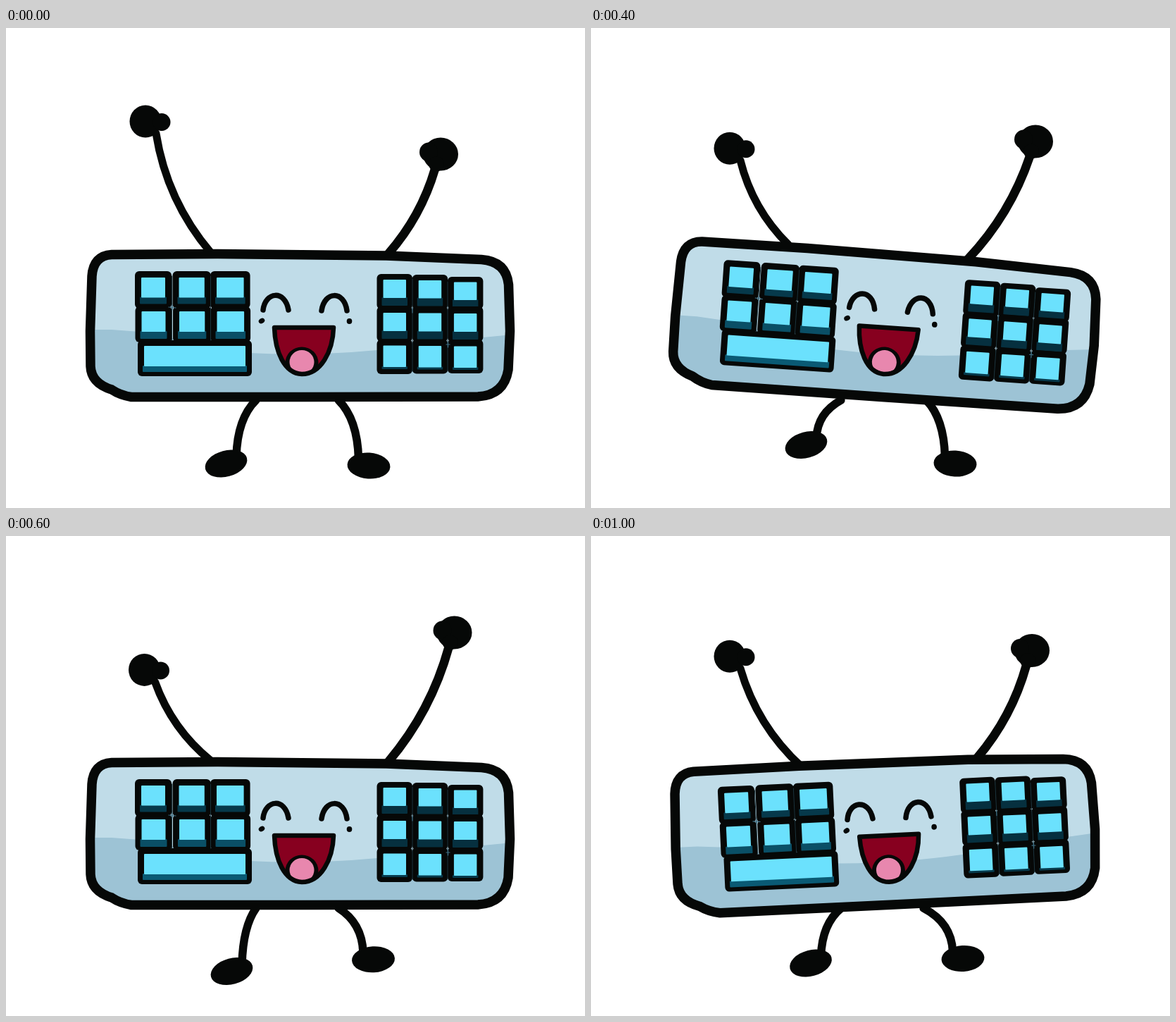
These frames come from a looping animation (822x681 px, 1.2 s). An HTML page with a canvas:

```html
<!DOCTYPE html>
<html lang="en">
<head>
<meta charset="utf-8">
<title>Dancing keyboard</title>
<style>
  html, body { margin: 0; width: 100%; height: 100%; overflow: hidden; background: #fff; }
  canvas { display: block; width: 822px; height: 681px; }
</style>
</head>
<body>
<canvas id="stage" width="822" height="681"></canvas>
<script>
const ctx = document.getElementById('stage').getContext('2d');
const INK = '#060807', LIGHT = '#c0dce8', SHADE = '#9dc3d5', KEY = '#6be1fd';
const STEP = 200, POSES = 6, RAD = Math.PI / 180;

// Body tilt in degrees, one value per pose
const TILT = [0, 2.7, 4, 0, -2, -2.7];

// Key points of hands and feet: pose, x, y
const HANDS = {
  left: [[0, 198, 132.5], [4, 196, 209]],
  right: [[0, 617, 179], [1, 612, 202.5], [2, 631, 161], [4, 642, 113], [5, 626, 162.5]]
};
const FEET = {
  left: [[0, 312.5, 618], [2, 305.5, 591.5], [3, 320.5, 617.5], [4, 313, 606.5], [5, 312, 606]],
  right: [[0, 515, 621], [2, 517, 618], [4, 526, 583.5], [5, 528, 599.5]]
};

// Position on a looping track of key points
function along(track, pose) {
  const i = track.findLastIndex(k => k[0] <= pose);
  const [t0, x0, y0] = track[i];
  const [t1, x1, y1] = track[(i + 1) % track.length];
  const p = (pose - t0) / ((t1 - t0 + POSES) % POSES);
  return [x0 + (x1 - x0) * p, y0 + (y1 - y0) * p];
}

function blob(x, y, rx, ry, deg = 0, color = INK) {
  ctx.fillStyle = color;
  ctx.beginPath();
  ctx.ellipse(x, y, rx, ry, deg * RAD, 0, Math.PI * 2);
  ctx.fill();
}

function line(path, width, color = INK) {
  ctx.strokeStyle = color;
  ctx.lineWidth = width;
  ctx.stroke(new Path2D(path));
}

function fill(path, color) {
  ctx.fillStyle = color;
  ctx.fill(path);
}

function box(x, y, w, h, r, color) {
  ctx.fillStyle = color;
  ctx.beginPath();
  ctx.roundRect(x, y, w, h, r);
  ctx.fill();
}

// Line from a to b, bowed sideways by a share of its length
function bow([ax, ay], [bx, by], bend, width) {
  const cx = (ax + bx) / 2 + (by - ay) * bend;
  const cy = (ay + by) / 2 - (bx - ax) * bend;
  line(`M${ax} ${ay}Q${cx} ${cy} ${bx} ${by}`, width);
}

function arms(pose) {
  const tilt = TILT[pose];
  let [x, y] = along(HANDS.left, pose);
  bow([x + 15, y + 17], [291 - 2.8 * tilt, 319 - 3 * tilt], -0.14, 11);
  blob(x, y, 22.5, 23);
  blob(x + 23, y + 1, 12.5, 12.5);

  [x, y] = along(HANDS.right, pose);
  bow([x - 8, y + 21], [543 - 2 * tilt, 320 + 2 * tilt], 0.11, 12.5);
  blob(x, y, 25, 23.5);
  blob(x - 17, y - 3, 13, 13.5);
  blob(x - 6, y + 14, 11, 10.5);
}

function leg(hip, [x, y], side, deg) {
  const knee = x - side * 16, ankle = x - side * 14.5;
  line(`M${hip} 528Q${knee} ${528 + (y - 528) * 0.29} ${ankle} ${y - 10}`, 11.5);
  blob(x, y, 30.5, 18.5, deg);
}

function legs(pose) {
  const right = along(FEET.right, pose);
  leg(355, along(FEET.left, pose), -1, -15);
  leg(472 + Math.max(0, TILT[pose]), right, 1, (right[1] - 610) * 0.35);
}

function key(x, y, w, h, top, faceH, stripH, strip) {
  box(x, y, w, h, 6, INK);
  box(x + 7, top + faceH - 1, w - 14, stripH + 1, 1, strip);
  box(x + 9, top, w - 18, faceH, 1, KEY);
}

function keys() {
  for (let c = 0; c < 3; c++) {
    const x = 183 + 53.5 * c, w = 52 + 2.3 * c;
    key(x, 345, w, 53, 354, 28.5, 9, '#06394b');
    key(x + 0.5, 395, w, 51, 402, 29, 10, '#0a4f66');
  }
  key(187, 443, 162, 51, 451, 29, 8, '#0a5a74');
  for (let c = 0; c < 3; c++) {
    const x = 526.5 + 50.2 * c, drop = c * c;
    key(x, 349 + drop, 50.5, 50 - drop, 357 + drop * 0.9, 26 - c / 3, 11, '#06303f');
    key(x, 395, 50.5, 50, 404 + c / 2, 26, 11, '#06303f');
    key(x, 442, 50.5, 49 - c / 2, 450.5 + c / 2, 30.5, 3, '#073a4c');
  }
  line('M235.5 352V443M290.5 352V443M577 356V487M627 360V487', 1, '#1b333c');
  line('M231 396L241 397M236 393V400M577 397V404M625 449H630M627.5 445V453', 1.2, '#3f7085');
}

function face() {
  line('M365 400C368 374 396 371 401 400M448 401C452 373 480 372 484 401', 7.5);
  blob(363, 415.5, 4.5, 3.5, -30);
  blob(487.5, 416, 3.8, 4);
  const mouth = new Path2D('M381 425L465 425C464 459 447 491 420 491C395 490 382 459 381 425Z');
  fill(mouth, '#87001f');
  ctx.save();
  ctx.clip(mouth);
  blob(420, 475, 23.5, 22.5);
  blob(420, 474, 17.5, 17, 0, '#e887ae');
  ctx.restore();
  ctx.strokeStyle = INK;
  ctx.lineWidth = 6.5;
  ctx.stroke(mouth);
}

function body(pose) {
  const shell = new Path2D('M150 321.5L300 320.5L540 323L675 328.5Q710 331 713.5 364L715.5 430L713 485Q707 521 670 523L420 523.5L178 523.5Q162 521 150 513Q121 504 120 480L119.5 430L122 352Q124 323 150 321.5Z');
  ctx.save();
  ctx.translate(418, 422);
  ctx.rotate(TILT[pose] * RAD);
  ctx.translate(-418, -422);
  fill(shell, LIGHT);
  ctx.save();
  ctx.clip(shell);
  fill(new Path2D('M110 428L150 428L190 431L345 461Q430 466 527 457L677 439L730 434V540H110Z'), SHADE);
  ctx.restore();
  ctx.strokeStyle = INK;
  ctx.lineWidth = 13.5;
  ctx.stroke(shell);
  keys();
  face();
  ctx.restore();
}

function draw(pose) {
  ctx.fillStyle = '#fff';
  ctx.fillRect(0, 0, 822, 681);
  ctx.lineCap = ctx.lineJoin = 'round';
  arms(pose);
  legs(pose);
  body(pose);
}

const start = performance.now();
function tick() {
  draw(Math.floor((performance.now() - start) / STEP) % POSES);
  requestAnimationFrame(tick);
}
tick();
</script>
</body>
</html>
```
